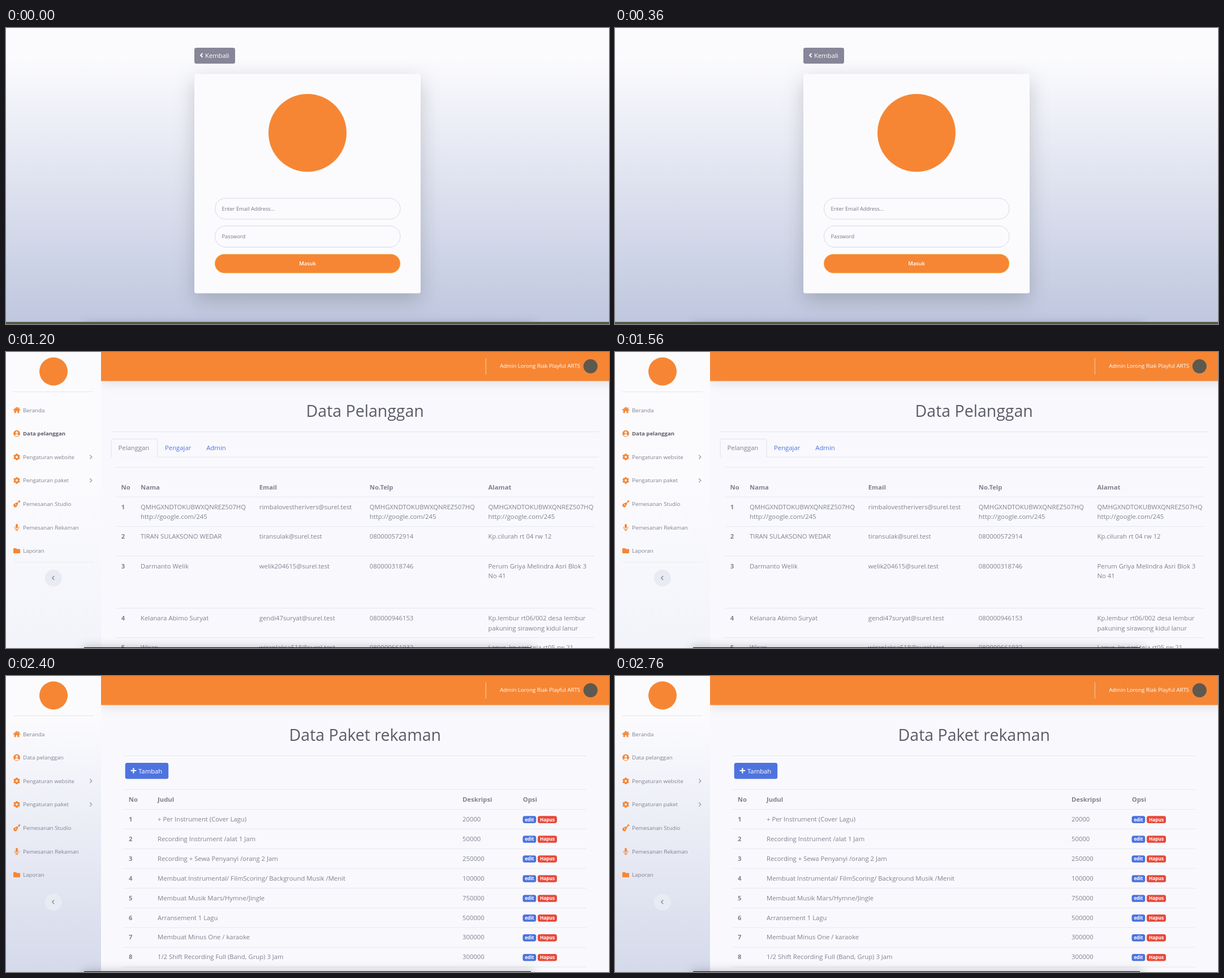
Animation of 1066 by 525 pixels, one loop 3 s. Source, as an HTML page:

```html
<!DOCTYPE html>
<html lang="id">
<head>
<meta charset="utf-8">
<title>Studio admin</title>
<style>
  html, body { margin: 0; width: 100%; height: 100%; overflow: hidden; background: #f9f9fd; }
  svg { display: block; width: 100vw; height: 100vh; }
  text { font: 500 11.3px "Open Sans", "Noto Sans", sans-serif; fill: #7f8190; white-space: pre; }
  .head { font-weight: 700; }
  .title { font-size: 28.5px; font-weight: 400; fill: #5a5c69; text-anchor: middle; }
  .nav { font-size: 9.8px; }
  .on { font-size: 9.6px; font-weight: 700; fill: #5a5c69; }
  .small { font-size: 9.25px; fill: #747683; }
  .mid { text-anchor: middle; }
  .strong { font-weight: 600; }
  .user { font-size: 9.6px; text-anchor: end; }
  .white { fill: #fff; }
  .link { fill: #4e73df; }
  .badge { font-size: 8.3px; font-weight: 700; text-anchor: middle; fill: #fff; }
  .lift { filter: drop-shadow(0 11px 17px rgba(0, 0, 0, .18)); }
  .bar { filter: drop-shadow(0 2px 10px rgba(58, 59, 69, .15)); }
  .soft { filter: blur(8px); }
  .scene { visibility: hidden; animation: show 3s step-end infinite; }
  @keyframes show {
    0% { visibility: visible; }
    20%, 100% { visibility: hidden; }
  }
</style>
</head>
<body>
<svg id="stage" viewBox="0 0 1066 525" preserveAspectRatio="none"></svg>
<script>
const ORANGE = '#f68634', BLUE = '#4e73df', RED = '#e74a3b', LINE = '#e3e6f0', PAPER = '#f9f9fd';
const BRAND = 'Lorong Riak', ADMIN = `Admin ${BRAND} Playful ARTS`;
const ROW = 17.5;

const text = (x, y, s, cls = '') => `<text x="${x}" y="${y}" class="${cls}">${s}</text>`;
const lines = (x, y, list) => list.map((s, i) => text(x, y + i * ROW, s)).join('');
const rect = (x, y, w, h, fill, r = 0, more = '') =>
  `<rect x="${x}" y="${y}" width="${w}" height="${h}" fill="${fill}" rx="${r}" ${more}/>`;
const disc = (x, y, r, fill) => `<circle cx="${x}" cy="${y}" r="${r}" fill="${fill}"/>`;
const path = (d, stroke, w = 1, more = '') =>
  `<path d="${d}" fill="none" stroke="${stroke}" stroke-width="${w}" ${more}/>`;
const rule = (x1, x2, y, color = LINE) => path(`M${x1} ${y}H${x2}`, color, .9);
const chevron = (x, y, dir, color, w = 1.6) =>
  path(`M${x - dir * 1.7} ${y - 3.4}l${dir * 3.4} 3.4l${-dir * 3.4} 3.4`, color, w);

// Page fade: starts a tenth down the page and ends at its foot.
const fade = (id, h) => `<linearGradient id="${id}" gradientUnits="userSpaceOnUse"
  x1="0" x2="0" y1="${h * .1}" y2="${h}"><stop stop-color="#fbfbfe"/><stop offset="1" stop-color="#bfc7df"/></linearGradient>`;

const icons = [
  `<path d="M-4.4 0L0-3.8 4.4 0V5.2H1.3V1.8H-1.3V5.2H-4.4z" fill="${ORANGE}"/>` +
    path('M-6.2 .4L0-4.8 6.2 .4M3.8-4.8v3', ORANGE, 1.4),
  disc(0, 0, 5.9, ORANGE) + disc(0, -1.7, 2.1, '#f8f8fc') +
    '<path d="M-3.6 3.6Q-3 1.1 0 1.1T3.6 3.6Q0 6 -3.6 3.6z" fill="#f8f8fc"/>',
  `<circle r="3.4" fill="none" stroke="${ORANGE}" stroke-width="2.9"/>` +
    [0, 60, 120].map(a => `<path d="M0-5.9V-4M0 4V5.9" stroke="${ORANGE}" stroke-width="2.9" transform="rotate(${a})"/>`).join(''),
  `<g transform="rotate(45)">${disc(0, 3.6, 3.3, ORANGE)}${disc(0, .2, 2.3, ORANGE)}` +
    `${rect(-.7, -7, 1.4, 7, ORANGE)}${rect(-1.5, -8, 3, 3.2, ORANGE, .6)}${disc(0, 2.4, 1, '#f4f5fa')}</g>`,
  rect(-1.9, -5.9, 3.8, 7.6, ORANGE, 1.9) +
    path('M-3.7-1V0a3.7 3.7 0 0 0 7.4 0V-1M0 3.7V5.6M-2.2 5.5H2.2', ORANGE, 1.1),
  `<path d="M-6-3.3q0-1.2 1.2-1.2H-1.2L.3-3H4.9Q6-3 6-1.8V3.3Q6 4.5 4.9 4.5H-4.8Q-6 4.5-6 3.3z" fill="${ORANGE}"/>`
];
const menu = ['Beranda', 'Data pelanggan', 'Pengaturan website', 'Pengaturan paket',
  'Pemesanan Studio', 'Pemesanan Rekaman', 'Laporan'];
const menuIcon = [0, 1, 2, 2, 3, 4, 5];

function sidebar(active, paint, w) {
  const items = menu.map((name, i) => {
    const y = 103 + i * 41.6;
    return `<g transform="translate(19 ${y})">${icons[menuIcon[i]]}</g>` +
      text(30, y + 3.6, name, i === active ? 'nav on' : 'nav') +
      (i === 2 || i === 3 ? chevron(150, y, 1, '#a5a8b8') : '');
  }).join('');
  return rect(0, 0, w, 525, `url(#${paint})`) + disc(84, 34.5, 25, ORANGE) +
    rule(13, 155, 70.5) + items + rule(13, 155, 373, '#e6e8f2') +
    disc(83.8, 401, 15, '#e9ebf3') + chevron(83.5, 400.8, -1, '#8d91a8');
}

// Desktop edge that shows below the window.
const dock = (x, w, y, color, shade) =>
  rect(135, 522, 800, 14, `rgba(30,32,50,${shade})`, 6, 'class="soft"') + rect(x, y, w, 525 - y, color);

function admin(active, paint, body, first) {
  const dx = first ? 1.5 : 0, w = first ? 168.5 : 168;
  return rect(0, 0, 1066, 525, PAPER) + body +
    rect(w, -20, 920, 71.5, ORANGE, 0, 'class="bar"') +
    path(`M${848.3 + dx} 11V40`, '#fbd0ae', 1) +
    text(1015 + dx, 28.4, ADMIN, 'user white') + disc(1033.3 + dx, 25.3, 12.5, '#5d594f') +
    sidebar(active, paint, w) +
    (first ? dock(0, 1066, 523.3, '#43443a', .13) : dock(138, 790, 523.8, '#15161c', .24));
}

const field = (y, h, label) =>
  rect(369.5, y, 327.5, h, '#fbfbfe', h / 2, 'stroke="#d1d3e2" stroke-width=".9"') +
  text(381.5, y + h / 2 + 3.2, label, 'small');

const login = rect(0, 0, 1066, 525, 'url(#full)') +
  rect(333, 35, 72, 28.3, '#868698', 3.5) + chevron(345.8, 48.4, -1, '#fff', 1.9) +
  text(352, 53.2, 'Kembali', 'white') +
  rect(333, 81.5, 400, 389, '#fbfbfe', 3.5, 'class="lift"') +
  disc(533, 186, 69, ORANGE) +
  field(302, 37, 'Enter Email Address...') + field(351, 37.7, 'Password') +
  rect(369.3, 401.2, 327.6, 33.2, ORANGE, 16.6, 'stroke="#f6b650" stroke-width=".8"') +
  text(533, 420.8, 'Masuk', 'small mid strong white') +
  dock(0, 1066, 521.3, '#55583f', .15);

const home = rect(168, 468, 898, 57, '#fcfcfe') +
  rect(186.5, 70.5, 862.5, 194.5, '#fafafd', 3.5, `stroke="${LINE}" stroke-width=".9"`) +
  rule(187, 1049, 106.2) + text(202, 92, 'Info Admin') + disc(258.5, 173.5, 53, ORANGE) +
  [`Nama : ${ADMIN}`, 'Email : lriakarts@surel.test', 'Telpon : 080000100142']
    .map((s, i) => text(343.8, 134.5 + i * 42.4, s) + rule(344, 680, 152.4 + i * 42.1)).join('') +
  text(698, 134.5, 'Tanggal Dibuat : 31 Maret 2021') + rule(698, 1033, 152.4) +
  lines(698, 177, ['Alamat : Jl. Raya Kelambang Km. 7, Sumarona, Kec. Padaranu,', 'Kab.Lanur, Jawa Teduh 00123']) +
  rule(698, 1033, 211.5) +
  text(617.8, 500.6, `Copyright © ${BRAND} | playful-art 2020`, 'small mid');

const heads = (y, cols) => cols.map(([x, s]) => text(x, y, s, 'head')).join('');

const code = ['QMHGXNDTOKUBWXQNREZ507HQ', 'http://google.com/245'];
const clients = [
  [278.5, code, 'rimbalovestherivers@surel.test', code, code],
  [331, ['TIRAN SULAKSONO WEDAR'], 'tiransulak@surel.test', ['080000572914'], ['Kp.cilurah rt 04 rw 12']],
  [383.5, ['Darmanto Welik'], 'welik204615@surel.test', ['080000318746'], ['Perum Griya Melindra Asri Blok 3', 'No 41']],
  [476, ['Kelanara Abimo Suryat'], 'gendi47suryat@surel.test', ['080000946153'],
    ['Kp.lembur rt06/002 desa lembur', 'pakuning sirawong kidul lanur']],
  [528, ['Wiran'], 'wiranlaksa518@surel.test', ['080000661932'], ['Lanur..kp.sari teja rt05 rw 21']]
];
const people = text(634.7, 115, 'Data Pelanggan', 'title') +
  rule(186, 1048, 141.5) + rule(186, 1048, 186.3) +
  `<path d="M186.2 186.8V157.5q0-3.3 3.3-3.3H264.7q3.3 0 3.3 3.3V186.8" fill="${PAPER}" stroke="#dddfeb" stroke-width=".9"/>` +
  text(198.5, 173.5, 'Pelanggan') + text(281, 173.5, 'Pengajar', 'link') + text(354.3, 173.5, 'Admin', 'link') +
  [204.5, 257, 309.5, 361.7, 454.3, 506.7].map(y => rule(195, 1040, y)).join('') +
  '<g clip-path="url(#table)">' +
  heads(243.5, [[203.5, 'No'], [238, 'Nama'], [447.8, 'Email'], [642.8, 'No.Telp'], [852.5, 'Alamat']]) +
  clients.map(([y, name, mail, tel, address], i) => text(203.8, y, i + 1, 'head') +
    lines(238, y, name) + text(447.8, y, mail) + lines(642.8, y, tel) + lines(852.5, y, address)).join('') +
  '</g>';

const badge = (x, y, w, fill, s) => rect(x, y, w, 12.6, fill, 3.6) + text(x + w / 2, y + 9.2, s, 'badge');

const listHead = (title, cols) => text(634.8, 115, title, 'title') + rule(208, 1026, 141.5) +
  rect(210.7, 154, 76.5, 28.5, BLUE, 3.5) + path('M220.5 167.8H230.3M225.4 162.9V172.7', '#fff', 2) +
  text(234, 172.6, 'Tambah', 'white') + rule(208, 1026, 201.3) + heads(222.5, cols);

// Each photo: backdrop, then flat blocks as [colour, x, y, w, h].
const photos = [
  ['#a08d78', ['#c7b59b', 0, 0, 40, 20], ['#8e6a4a', 52, 0, 23, 34], ['#5b4636', 0, 16, 12, 30],
    ['#6c7f9f', 14, 30, 54, 26], ['#b9c1cd', 18, 20, 14, 16], ['#b98a58', 32, 32, 24, 14],
    ['#3e3a3c', 34, 16, 16, 13], ['#d9d3c8', 0, 46, 16, 10]],
  ['#4a3a40', ['#8f3566', 0, 0, 22, 26], ['#36323f', 22, 0, 28, 30], ['#6e7284', 30, 6, 8, 22],
    ['#2b2324', 50, 6, 25, 28], ['#9c8b52', 18, 36, 57, 20], ['#d1bd83', 34, 37, 24, 9],
    ['#8a7650', 0, 30, 20, 26], ['#b23a3a', 58, 26, 8, 12]],
  ['#b9bdb9', ['#d4d6d2', 8, 0, 50, 18], ['#878b8a', 0, 0, 8, 34], ['#8f9b94', 20, 34, 55, 22],
    ['#2c2b2e', 14, 22, 30, 13], ['#242327', 48, 18, 18, 20], ['#3b3434', 0, 36, 24, 20],
    ['#5c3f38', 4, 42, 15, 8], ['#c9cfca', 38, 38, 18, 8]],
  ['#1d1a33', ['#5d3432', 0, 0, 26, 13], ['#2a2247', 26, 6, 49, 22], ['#34308a', 22, 24, 36, 18],
    ['#8a45c9', 28, 29, 16, 5], ['#3b82c9', 40, 23, 8, 6], ['#11111f', 0, 42, 75, 14],
    ['#6b2f4f', 58, 32, 17, 9], ['#0f1020', 0, 16, 15, 28]]
];
const photo = (i, x, y) => {
  const [back, ...blocks] = photos[i];
  return `<g transform="translate(${x} ${y})">${rect(0, 0, 75, 56, back)}` +
    blocks.map(([c, bx, by, w, h]) => rect(bx, by, w, h, c)).join('') + '</g>';
};

const works = [['Tradisional campur', ''], ['Studio 2', 'Medium Comfort'],
  ['Studio 1', 'Small and Simple'], ['Studio Recording', '']];
const portfolio = listHead('Data Portfolio', [[216.8, 'No'], [250.5, 'Judul'], [400.5, 'Jenis'], [590.5, 'Foto'],
    [684, 'Pembuat'], [836, 'Status'], [890.5, 'Tanggal'], [978.8, 'Opsi']]) +
  works.map(([name, kind], i) => {
    const y = 257.7 + i * 73.6;
    return rule(208, 1026, y - 21.2) + text(217, y, i + 1, 'head') + text(250.5, y, name) + text(400.5, y, kind) +
      photo(i, 590.3, y - 12.6) + lines(684, y, [`Admin ${BRAND}`, 'Playful ARTS']) + text(836.3, y, 'Admin') +
      lines(890.5, y, ['12', 'November', '2020']) +
      badge(978.5, y - 9.4, 23.7, BLUE, 'edit') + badge(978.5, y + 8.1, 34.3, RED, 'Hapus');
  }).join('');

const packs = [['+ Per Instrument (Cover Lagu)', 20000], ['Recording Instrument /alat 1 Jam', 50000],
  ['Recording + Sewa Penyanyi /orang 2 Jam', 250000],
  ['Membuat Instrumental/ FilmScoring/ Background Musik /Menit', 100000],
  ['Membuat Musik Mars/Hymne/Jingle', 750000], ['Arransement 1 Lagu', 500000],
  ['Membuat Minus One / karaoke', 300000], ['1/2 Shift Recording Full (Band, Grup) 3 Jam', 300000]];
const prices = listHead('Data Paket rekaman', [[216.8, 'No'], [268, 'Judul'], [807, 'Deskripsi'], [913.7, 'Opsi']]) +
  packs.map(([name, price], i) => {
    const y = 257.7 + i * 34.96;
    return rule(208, 1026, y - 21.2) + text(217, y, i + 1, 'head') + text(268, y, name) + text(807, y, price) +
      badge(913.5, y - 9.4, 23.7, BLUE, 'edit') + badge(940, y - 9.4, 34, RED, 'Hapus');
  }).join('') + rule(208, 1026, 516.2);

const scenes = [login, admin(0, 'full', home, true), admin(1, 'tall', people),
  admin(-1, 'mid', portfolio), admin(-1, 'mid', prices)];

document.getElementById('stage').innerHTML =
  `<defs>${fade('full', 525)}${fade('tall', 2300)}${fade('mid', 780)}` +
  '<clipPath id="table"><rect x="186" y="190" width="854" height="335"/></clipPath></defs>' +
  scenes.map((s, i) => `<g class="scene" style="animation-delay:${(i * .6 - 3).toFixed(1)}s">${s}</g>`).join('');
</script>
</body>
</html>
```
